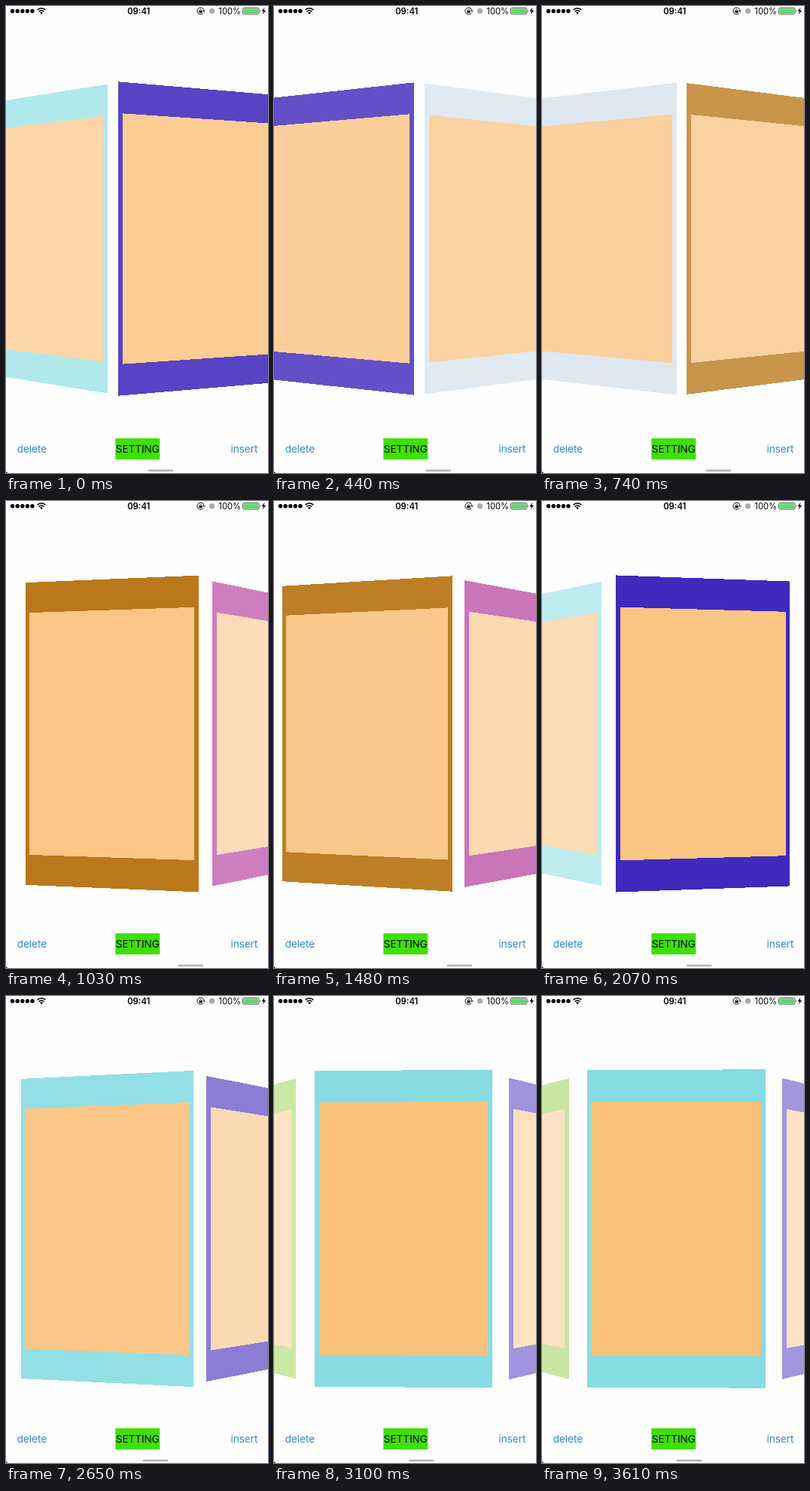
Recreate the animation shown at these times as an HTML page. Size 348 px wide and 619 px high, loop 3.71 s.

```html
<!DOCTYPE html>
<html lang="en">
<head>
<meta charset="utf-8">
<title>Card carousel</title>
<style>
  html, body { margin: 0; width: 100%; height: 100%; overflow: hidden; background: #fefefe; }
  svg { display: block; width: 348px; height: 619px; font-family: Inter, Roboto, sans-serif; }
  .label { font-size: 13.5px; }
  .link { fill: #2f88da; }
</style>
</head>
<body>
<svg viewBox="0 0 348 619">
  <g id="cards" shape-rendering="crispEdges"></g>

  <g id="signal"></g>
  <path d="M41.6 5.2a7.6 7.6 0 0 1 10.8 0M43.5 7.4a4.9 4.9 0 0 1 7 0" fill="none" stroke="#000" stroke-width="1.5"/>
  <path d="M47 11l-2-2.1a2.9 2.9 0 0 1 4 0z"/>
  <text x="176.3" y="10.7" font-size="11.3" font-weight="600" text-anchor="middle">09:41</text>
  <path d="M262.2 9.2a4.5 4.5 0 1 1 .8-2.6M261.3 6l1.7 1.8 1.4-1.8" fill="none" stroke="#111"/>
  <path d="M256.5 6.2h4v3h-4z"/>
  <path d="M257.3 6.5v-.8a1.2 1.2 0 0 1 2.4 0v.8" fill="none" stroke="#111" stroke-width=".8"/>
  <circle cx="273.5" cy="6.7" r="3.6" fill="#aaa"/>
  <text x="312" y="10.7" font-size="11.2" text-anchor="end">100%</text>
  <rect x="314.5" y="2.5" width="21.5" height="8.5" rx="1.8" fill="none" stroke="#333" stroke-width=".8"/>
  <rect x="315.5" y="3.5" width="19.5" height="6.5" rx=".8" fill="#62d86b"/>
  <path d="M337 5.2q1.3 1.5 0 3z"/>
  <path d="M343.4 2l-3.9 5.2h2.5l-1.2 4 4.4-5.5h-2.6z"/>

  <text class="label link" x="14.7" y="592">delete</text>
  <rect x="145.3" y="573" width="59" height="28" fill="#3fe003"/>
  <text class="label" x="174.8" y="592" text-anchor="middle">SETTING</text>
  <text class="label link" x="334.4" y="592" text-anchor="end">insert</text>
  <rect id="thumb" y="614.6" width="33.5" height="2.4" rx="1.2" fill="#b2b2b2"/>
  <path d="M0 617v2h2z"/>
</svg>
<script>
const LOOP = 3710, TICK = 147;
const CENTER_X = 180, CENTER_Y = 308.5;
const COLORS = ['#87ca30', '#85dce2', '#3016b7', '#d5e0ec', '#b46a02', '#a5128a'];

// Key points of the scroll: [tick, position in cards].
const SCROLL = [
  [0, 1.647], [3, 2.45], [5, 3.478], [7, 4.174], [10, 4.25],
  [12, 2.7], [14, 1.852], [18, 1.202], [22, 1.004], [24, 1.008]
];

const SVG = 'http://www.w3.org/2000/svg';
const byId = id => document.getElementById(id);

function add(parent, tag, attributes = {}) {
  const element = document.createElementNS(SVG, tag);
  for (const name in attributes) element.setAttribute(name, attributes[name]);
  return parent.appendChild(element);
}

for (let i = 0; i < 5; i++) add(byId('signal'), 'circle', { cx: 8.6 + i * 6.6, cy: 6.7, r: 2.7 });

const cards = COLORS.map(fill => {
  const group = add(byId('cards'), 'g');
  return {
    group,
    frame: add(group, 'polygon', { fill }),
    inner: add(group, 'polygon', { fill: '#fbc07a' })
  };
});

// Smooth curve through the key points, with slopes taken from their neighbours.
function scrollAt(tick) {
  const last = SCROLL.length - 1;
  const slopeAt = i => {
    const [t0, p0] = SCROLL[Math.max(i - 1, 0)];
    const [t1, p1] = SCROLL[Math.min(i + 1, last)];
    return (p1 - p0) / (t1 - t0);
  };
  let i = 0;
  while (i < last - 1 && SCROLL[i + 1][0] <= tick) i++;
  const [t0, p0] = SCROLL[i], [t1, p1] = SCROLL[i + 1];
  const span = t1 - t0;
  const u = Math.min((tick - t0) / span, 1);
  const ease = u * u * (3 - 2 * u);
  return p0 + (p1 - p0) * ease +
    span * u * (1 - u) * (slopeAt(i) * (1 - u) - slopeAt(i + 1) * u);
}

function drawPanel(polygon, side, near, far, heightAt) {
  const corner = (x, sign) => [CENTER_X + side * x, CENTER_Y + sign * heightAt(x) / 2];
  polygon.setAttribute('points',
    [corner(near, -1), corner(far, -1), corner(far, 1), corner(near, 1)].join(' '));
}

// Cards turn away and fade with their distance from the centre.
function drawCard({ group, frame, inner }, offset) {
  const d = Math.abs(offset), side = Math.sign(offset) || 1;
  const visible = d < 1.2;
  group.setAttribute('visibility', visible ? 'visible' : 'hidden');
  if (!visible) return;

  const near = -118.5 + 241 * d + 19 * d * d;
  const far = near + 237.3 - 32 * d - 50 * d * d;
  const nearHeight = 422.3 - 13 * d - 10.5 * d * d;
  const slope = 0.47 * d + 0.03 * d * d;
  const heightAt = x => nearHeight - slope * (x - near);

  group.setAttribute('opacity', 1 - 0.56 * d);
  drawPanel(frame, side, near, far, heightAt);
  drawPanel(inner, side, near + 6, far - 6 + 4 * d, x => 0.8 * heightAt(x));
}

function render(time) {
  const position = scrollAt(Math.floor(time % LOOP / TICK));
  cards.forEach((card, i) => drawCard(card, i - position));
  byId('thumb').setAttribute('x', 178.6 + 15.8 * (position - 1));
}

const begin = performance.now();
function tick() {
  render(performance.now() - begin);
  requestAnimationFrame(tick);
}
tick();
</script>
</body>
</html>
```
